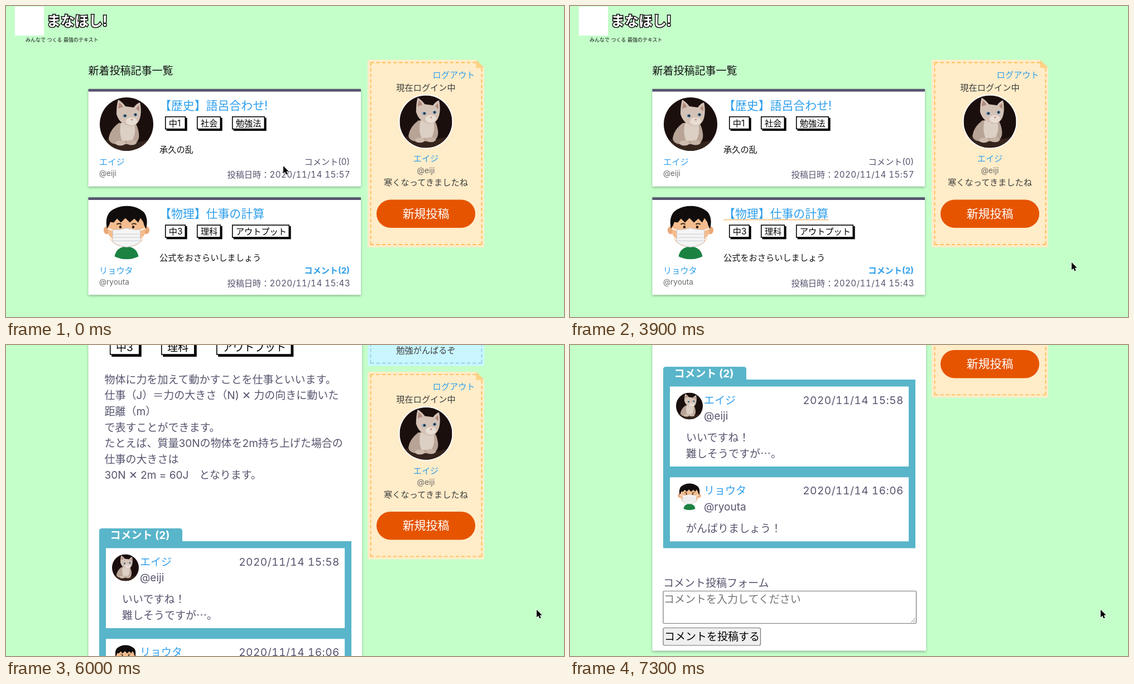
An HTML page for the animation above (7400 ms loop, 1000 by 558 pixels).

```html
<!DOCTYPE html>
<html lang="ja">
<head>
<meta charset="utf-8">
<title>学習記事サイト</title>
<style>
html, body { margin: 0; width: 100%; height: 100%; overflow: hidden; background: #c4ffca; }
svg { display: block; width: 100%; height: 100%; }
text { font-family: Inter, "Noto Sans CJK JP", "Noto Sans CJK", sans-serif; white-space: pre; }
.cjk { font-family: "Noto Sans CJK JP", "Noto Sans CJK", sans-serif; }
.num { font-variant-numeric: tabular-nums; letter-spacing: .03em; }
.lift { filter: drop-shadow(0 2px 2px rgba(0, 0, 0, .28)); }
</style>
</head>
<body>
<svg id="stage" viewBox="0 0 1000 558" preserveAspectRatio="none"></svg>
<script>
const LOOP = 7400, STEP = 100, OPEN_AT = 4400, HOVER_AT = 2200;
const S = 15.2, M = 19, L = 20.9;
const INK = '#56556e', LINK = '#2e9fed', DARK = '#3c3c3c', GREY = '#6b6b6b', BG = '#c4ffca';
const CAT = { name: 'エイジ', id: '@eiji' }, BOY = { name: 'リョウタ', id: '@ryouta' };

// Text is placed by the vertical centre of its line.
const text = (x, cy, size, fill, str, anchor = 'start', extra = '') =>
  `<text x="${x}" y="${cy + size * .37}" font-size="${size}" fill="${fill}" text-anchor="${anchor}" ${extra}>${str}</text>`;
const rect = (x, y, w, h, fill, extra = '') =>
  `<rect x="${x}" y="${y}" width="${w}" height="${h}" fill="${fill}" ${extra}/>`;
const path = (d, fill, extra = '') => `<path d="${d}" fill="${fill}" ${extra}/>`;
const oval = (x, y, rx, ry, fill, extra = '') =>
  `<ellipse cx="${x}" cy="${y}" rx="${rx}" ry="${ry}" fill="${fill}" ${extra}/>`;
const line = (d, color, w) => path(d, 'none', `stroke="${color}" stroke-width="${w}" stroke-linecap="round"`);
const num = s => `<tspan class="num">${s}</tspan>`;

const catArt = rect(0, 0, 96, 96, '#1b0f0e')
  + path('M0 78Q24 72 48 78T96 72V96H0Z', '#35241c')
  + path('M34 46Q18 58 16 74Q18 84 32 84H62Q72 78 70 64Q68 50 62 44Z', '#b8a496')
  + path('M38 46Q34 64 40 78H58Q66 64 62 46Z', '#dccfc3')
  + path('M30 30Q30 14 33 4Q41 9 46 16L61 18Q66 11 72 9Q75 21 73 33Q70 50 56 52Q36 50 30 30Z', '#d3c2b5')
  + path('M33 20L35 9Q39 12 42 17ZM65 20L70 14Q71 19 71 25Z', '#b08a7c')
  + oval(57, 43, 10, 7, '#e8ddd3')
  + oval(45, 33, 3.4, 2.8, '#5b87a8') + oval(64, 31, 3.2, 2.8, '#5b87a8')
  + oval(45.4, 33, 1.5, 2.2, '#1c2630') + oval(64, 31, 1.5, 2.2, '#1c2630')
  + path('M55 39H60L57.6 42Z', '#bd8678')
  + oval(37, 82, 9, 4.5, '#cdbcae') + oval(57, 81, 9, 4.5, '#c6b3a5');

const boyArt = path('M26 96Q27 74 48 73Q69 74 70 96Z', '#1b8242')
  + oval(12.5, 44, 5.5, 7, '#eba878') + oval(83.5, 44, 5.5, 7, '#eba878')
  + path('M15 30Q20 14 48 12Q76 14 81 30Q86 73 48 74Q10 73 15 30Z', '#f4bd8f')
  + path('M13 41Q9 22 18 11Q30 0 49 0Q68 0 78 10Q88 22 83 41Q80 38 78 29L73 22L69 30L62 23L54 30L46 22L38 30L31 23L25 30L19 29Q17 36 13 41Z', '#100d0c')
  + line('M31 33Q35 31 38 33M58 33Q61 31 65 33', '#2c1c12', 1.8)
  + oval(37, 38, 2.2, 2.5, '#24170f') + oval(60, 38, 2.2, 2.5, '#24170f')
  + line('M26 45L15 41M70 45L81 41M27 66L16 54M69 66L80 54', '#fff', 1.8)
  + path('M23.5 43Q36 44 48 40Q60 44 72.5 43V65Q62 73 48 74Q34 73 23.5 65Z', '#f4f4f4', 'stroke="#c8c8ce"')
  + line('M26 51H70M26 57H70M26 63H70', '#d2d4d9', 1.2);

function avatar(art, cx, cy, r, ring = 0) {
  const k = r / 48;
  return (ring ? `<circle cx="${cx}" cy="${cy}" r="${r + ring / 2}" fill="none" stroke="#fff" stroke-width="${ring}"/>` : '')
    + `<g transform="translate(${cx - r} ${cy - r}) scale(${k})" clip-path="url(#round)">${art}</g>`;
}

function tag(x, y, w, size, label) {
  const k = size / S, h = 23.4 * k, d = 2.6 * k;
  return rect(x + d, y + d, w, h, '#000')
    + rect(x + .75, y + .75, w - 1.5, h - 1.5, '#fff', 'stroke="#000" stroke-width="1.6"')
    + text(x + 6.8 * k + (k > 1 ? 2.5 : 0), y + h / 2 + .7, size, '#000', label);
}

function card(x, y, w, h) {
  return rect(x, y, w, h, '#fff', 'class="lift"') + rect(x, y, w, 4.8, INK);
}

const header = rect(16, 1, 52, 52, '#fff')
  + text(73, 27, 25, '#fff', 'まなほし!', 'start', 'font-weight="700" stroke="#111" stroke-width="3" paint-order="stroke"')
  + text(35, 61, 9, '#111', 'みんなで つくる 最強のテキスト');

function post(dy, art, user, title, tags, note, comments, time) {
  const at = y => y + dy;
  return card(147.5, at(148.8), 488.5, 175)
    + avatar(art, 216, at(212), 48)
    + text(275, at(177.8), L, LINK, title)
    + tags.map(([x, w, s]) => tag(x, at(198), w, S, s)).join('')
    + text(275, at(257), S, '#111', note)
    + text(167, at(279.7), S, LINK, user.name)
    + text(167, at(300.5), 13.5, GREY, user.id)
    + comments(at(279.7))
    + text(617, at(302.5), S, INK, '投稿日時：' + num('2020/11/14 ' + time), 'end');
}

// Each side carries whole dashes from corner to corner.
function dashed(x, y, w, h, color) {
  const side = (d, len) => {
    const n = Math.round((len - 6) / 10);
    return path(d, 'none', `stroke="${color}" stroke-width="1.9" stroke-dasharray="6 ${(len - 6) / n - 6}"`);
  };
  return side(`M${x} ${y}h${w}`, w) + side(`M${x} ${y + h}h${w}`, w)
    + side(`M${x} ${y}v${h}`, h) + side(`M${x + w} ${y}v${h}`, h);
}

function panel(y, h, fill, dash, fold) {
  return rect(648, y, 209, h, fill)
    + dashed(653.5, y + 5, 199, h - 10, dash)
    + path(`M842.5 ${y - 2}H859V${y + 14.5}H857L842.5 ${y}Z`, BG)
    + path(`M842.5 ${y}V${y + 14.5}H857Z`, fold);
}

const mid = (cy, size, fill, str) => text(752.5, cy, size, fill, str, 'middle');

function loginPanel(dy) {
  return `<g transform="translate(0 ${dy})">`
    + panel(96.5, 336.5, '#ffecc8', '#ffbd55', '#ffd083')
    + text(840.5, 123, S, LINK, 'ログアウト', 'end')
    + mid(146, S, DARK, '現在ログイン中')
    + avatar(catArt, 752.5, 207.5, 47, 2)
    + mid(273.5, S, LINK, CAT.name)
    + mid(294.5, 14, GREY, CAT.id)
    + mid(316.7, S, DARK, '寒くなってきましたね')
    + rect(664, 347.5, 177, 50.5, '#e65400', 'rx="25.2"')
    + text(752.5, 372, L, '#fff', '新規投稿', 'middle', 'font-weight="500"')
    + '</g>';
}

const home = header
  + text(147.5, 115.5, M, '#111', '新着投稿記事一覧')
  + post(0, catArt, CAT, '【歴史】語呂合わせ!',
    [[285, 37, '中1'], [342, 43, '社会'], [405, 59, '勉強法']], '承久の乱',
    y => text(616, y, S, INK, 'コメント(0)', 'end'), '15:57')
  + post(194.4, boyArt, BOY, '【物理】仕事の計算',
    [[285, 37, '中3'], [342, 43, '理科'], [405, 103, 'アウトプット']], '公式をおさらいしましょう',
    y => text(616, y, S, LINK, 'コメント(2)', 'end', 'font-weight="700"'), '15:43')
  + rect(275, 383, 188.5, 1.2, '#f3ab58', 'id="hover"')
  + loginPanel(0);

function comment(y, h, art, user, time, lines) {
  return rect(179, y, 428, h, '#fff')
    + avatar(art, 214, y + 35, 24)
    + text(240, y + 24, M, LINK, user.name)
    + text(240, y + 52.7, M, INK, user.id)
    + text(598, y + 24, M, INK, num('2020/11/14 ' + time), 'end')
    + lines.map((s, i) => text(208, y + 91.7 + i * 28.6, M, INK, s, 'start', 'class="cjk"')).join('');
}

const body = ['物体に力を加えて動かすことを仕事といいます。', '仕事（J）＝力の大きさ（N) ✕ 力の向きに動いた', '距離（m）',
  'で表すことができます。', 'たとえば、質量30Nの物体を2m持ち上げた場合の', '仕事の大きさは', '30N ✕ 2m = 60J　となります。'];

const article = header
  + card(147.5, 100.8, 490.5, 1024.7)
  + text(167, 143.5, 38, INK, '【物理】仕事の計算')
  + text(167, 186.8, M, INK, '公式をおさらいしましょう')
  + ['投稿', '更新'].map((s, i) => text(167, 215.5 + i * 28.6, M, INK, s + '日時：' + num('2020/11/14 15:43'))).join('')
  + tag(186, 275.5, 53.5, M, '中3') + tag(278, 275.5, 60.5, M, '理科') + tag(377, 275.5, 135, M, 'アウトプット')
  + body.map((s, i) => text(176.5, 348.8 + i * 28.6, M, INK, s)).join('')
  + path('M167 640V621Q167 616 172 616H311Q316 616 316 621V640Z', '#59b5ca')
  + rect(167, 639, 452, 302.5, '#59b5ca')
  + text(186.5, 628, M, '#fff', 'コメント (2)', 'start', 'font-weight="700"')
  + comment(651.5, 143.5, catArt, CAT, '15:58', ['いいですね！', '難しそうですが…。'])
  + comment(814.3, 115, boyArt, BOY, '16:06', ['がんばりましょう！'])
  + text(167, 1004, M, INK, 'コメント投稿フォーム')
  + rect(167, 1018.5, 453.5, 58, '#fff', 'rx="1.5" stroke="#767676" stroke-width="1.2"')
  + text(168, 1033.3, M, '#757575', 'コメントを入力してください')
  + line('M611.5 1074.5L618.5 1067.5M615.5 1074.5L618.5 1071.5', '#888', 1)
  + rect(167, 1084.5, 174.5, 31.5, '#efefef', 'rx="3" stroke="#767676" stroke-width="1.2"')
  + text(169, 1100.3, M, '#000', 'コメントを投稿する')
  + panel(96.5, 228, '#c9f6ff', '#97cfe4', '#9fdcf5')
  + mid(123.5, S, DARK, 'この記事の投稿者')
  + avatar(boyArt, 752.5, 184.5, 48, 2)
  + mid(251, S, LINK, BOY.name)
  + mid(274, S, DARK, BOY.id)
  + mid(296.5, S, DARK, '勉強がんばるぞ')
  + loginPanel(238.4);

const stage = document.getElementById('stage');
stage.innerHTML = '<defs><clipPath id="round"><circle cx="48" cy="48" r="48"/></clipPath></defs>'
  + rect(0, 0, 1000, 558, BG)
  + `<g id="home">${home}</g><g id="article">${article}</g>`
  + path('M0 0V13.6L3.2 10.7L5.4 15.6L7.7 14.6L5.5 9.8H9.7Z', '#000', 'id="cursor" stroke="#fff" stroke-width="1.1" paint-order="stroke"');
const el = id => document.getElementById(id);
const homeEl = el('home'), articleEl = el('article'), hoverEl = el('hover'), cursorEl = el('cursor');

const cursorKeys = [[0, 497, 287], [700, 492, 297], [1600, 458, 328], [2300, 400, 372], [3100, 396, 374],
  [3900, 899, 460], [4500, 956, 477], [5000, 951, 475]];
const scrollKeys = [[5150, 0], [5700, 109.5], [6400, 518], [7000, 577]];

// Monotone cubic through the keys: smooth without overshoot.
function ease(keys, c, t) {
  const last = keys.length - 1;
  if (t <= keys[0][0]) return keys[0][c];
  if (t >= keys[last][0]) return keys[last][c];
  const i = keys.findIndex(k => k[0] > t) - 1;
  const slope = j => (keys[j + 1][c] - keys[j][c]) / (keys[j + 1][0] - keys[j][0]);
  const tangent = j => {
    if (j === 0 || j === last) return 0;
    const a = slope(j - 1), b = slope(j);
    return a * b > 0 ? 2 * a * b / (a + b) : 0;
  };
  const [p, q] = [keys[i], keys[i + 1]], h = q[0] - p[0], u = (t - p[0]) / h, v = 1 - u;
  return p[c] * (1 + 2 * u) * v * v + q[c] * u * u * (3 - 2 * u)
    + h * u * v * (tangent(i) * v - tangent(i + 1) * u);
}

function draw(t) {
  const opened = t >= OPEN_AT;
  homeEl.setAttribute('display', opened ? 'none' : 'inline');
  articleEl.setAttribute('display', opened ? 'inline' : 'none');
  hoverEl.setAttribute('display', t >= HOVER_AT ? 'inline' : 'none');
  articleEl.setAttribute('transform', `translate(0 ${-ease(scrollKeys, 1, t)})`);
  cursorEl.setAttribute('transform', `translate(${ease(cursorKeys, 1, t)} ${ease(cursorKeys, 2, t)})`);
}

let start;
function tick(now) {
  start ??= now;
  draw(Math.floor((now - start) % LOOP / STEP) * STEP);
  requestAnimationFrame(tick);
}
draw(0);
requestAnimationFrame(tick);
</script>
</body>
</html>
```
